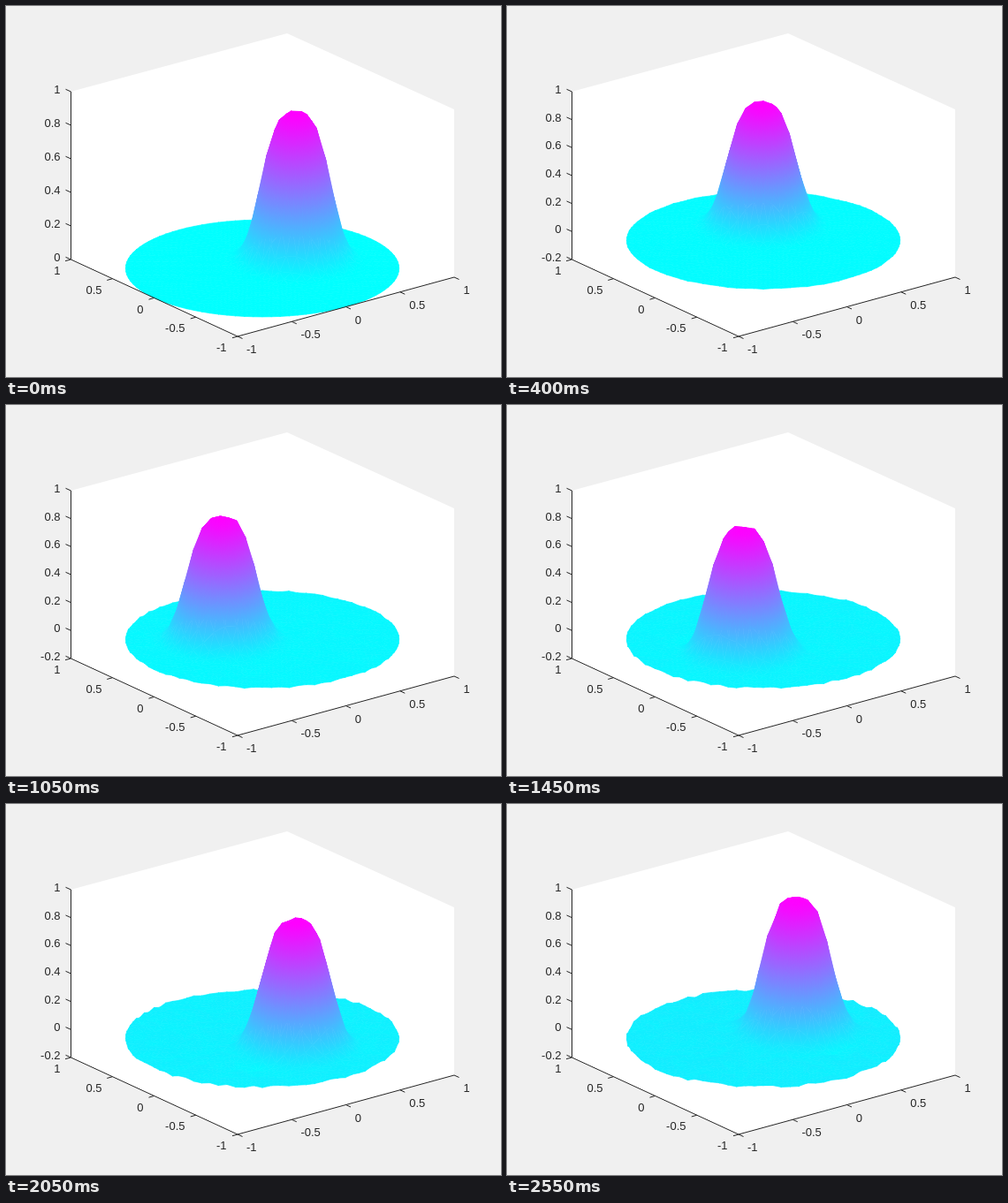
An HTML page with a canvas that plays this animation: 560x420 px, repeating every 2.6 s.

```html
<!DOCTYPE html>
<html lang="en">
<head>
<meta charset="utf-8">
<title>Rotating hump on a disk</title>
<style>
html, body { margin: 0; width: 100%; height: 100%; overflow: hidden; background: #f0f0f0; }
canvas, svg { position: absolute; left: 0; top: 0; width: 560px; height: 420px; }
text { font: 13px "Liberation Sans", Arial, sans-serif; fill: #262626; }
path { stroke: #262626; stroke-width: 1; fill: none; }
</style>
</head>
<body>
<canvas id="plot" width="560" height="420"></canvas>
<svg viewBox="0 0 560 420">
  <path id="lines"/>
  <g id="fixed"></g>
  <g id="heights"></g>
</svg>
<script>
const LOOP = 2600, STEP = 50, TURN = 2550;
const RINGS = 16, ORBIT = 0.3;
const ctx = document.getElementById('plot').getContext('2d');
const byId = id => document.getElementById(id);

// Disk mesh: ring i holds 6i nodes; u points right, d points away from the viewer.
const nodes = [{ u: 0, d: 0 }];
const tris = [];
const nodeAt = (ring, k) =>
  ring ? 1 + 3 * ring * (ring - 1) + (k % (6 * ring)) : 0;

function buildMesh() {
  for (let i = 1; i <= RINGS; i++) {
    for (let k = 0; k < 6 * i; k++) {
      const a = k / (6 * i) * 2 * Math.PI;
      nodes.push({ u: i / RINGS * Math.cos(a), d: i / RINGS * Math.sin(a) });
    }
    for (let s = 0; s < 6; s++) {
      for (let k = 0; k < i; k++) {
        const o = s * i + k, n = s * (i - 1) + k;
        tris.push([nodeAt(i, o), nodeAt(i, o + 1), nodeAt(i - 1, n)]);
        if (k < i - 1) {
          tris.push([nodeAt(i - 1, n), nodeAt(i, o + 1), nodeAt(i - 1, n + 1)]);
        }
      }
    }
  }
  let seed = 7;
  const random = () => (seed = seed * 16807 % 2147483647) / 2147483647;
  for (const n of nodes) {
    n.phase = random() * 6.283;
    n.rate = 0.15 + random() * 0.45;
  }
  const depth = t => t.reduce((sum, i) => sum + nodes[i].d, 0);
  tris.sort((a, b) => depth(b) - depth(a));
}

function cool(v) {
  const c = Math.max(0, Math.min(1, v));
  return `rgb(${Math.round(255 * c)},${Math.round(255 * (1 - c))},255)`;
}

// A linear gradient reproduces linear interpolation over the triangle.
function shade(a, b, c) {
  const x1 = b.x - a.x, y1 = b.y - a.y, x2 = c.x - a.x, y2 = c.y - a.y;
  const det = x1 * y2 - x2 * y1, v1 = b.v - a.v, v2 = c.v - a.v;
  const mean = (a.v + b.v + c.v) / 3;
  const lo = Math.min(a.v, b.v, c.v), hi = Math.max(a.v, b.v, c.v);
  if (Math.abs(det) < 0.5 || hi - lo < 0.008) return cool(mean);
  const gx = (v1 * y2 - v2 * y1) / det, gy = (x1 * v2 - x2 * v1) / det;
  const g2 = gx * gx + gy * gy;
  const at = v => [a.x + gx * (v - a.v) / g2, a.y + gy * (v - a.v) / g2];
  const grad = ctx.createLinearGradient(...at(lo), ...at(hi));
  grad.addColorStop(0, cool(lo));
  grad.addColorStop(1, cool(hi));
  return grad;
}

function polygon(points) {
  ctx.beginPath();
  points.forEach(([x, y]) => ctx.lineTo(x, y));
  ctx.closePath();
}

function drawSurface(step) {
  const s = step * STEP / TURN;
  const phi = 2 * Math.PI * s - 0.95;
  const sin = Math.sin(phi), cos = Math.cos(phi);
  const cu = -ORBIT * sin, cd = ORBIT * cos;
  const wakeU = cu + 0.4 * cos, wakeD = cd + 0.4 * sin;
  const peak = 0.876 + 0.055 * s ** 3, low = -0.066 * s;
  const zScale = step ? 190 / 1.2 : 190;
  const y0 = step ? 297 - 190 / 6 : 297;

  for (const n of nodes) {
    const r = Math.hypot(n.u - cu, n.d - cd);
    const bump = Math.exp(-((r / 0.292) ** 3.3));
    const wake = Math.hypot(n.u - wakeU, n.d - wakeD) / 0.16;
    const ripple = 0.01 * s ** 0.75 * Math.sin(n.phase + n.rate * step);
    const z = peak * bump + ripple * (1 + 0.6 * bump) - 0.045 * s * Math.exp(-wake * wake);
    n.x = 290 + 154.7 * n.u;
    n.y = y0 - 54.9 * n.d - zScale * z;
    n.v = (z - low) / (peak - low);
  }

  ctx.clearRect(0, 0, 560, 420);
  ctx.fillStyle = '#fff';
  polygon([[73, 97], [318, 31], [507, 117], [507, 307], [262, 374], [73, 287]]);
  ctx.fill();
  ctx.lineWidth = 0.7;
  ctx.lineJoin = 'round';
  for (const t of tris) {
    const [a, b, c] = t.map(i => nodes[i]);
    ctx.fillStyle = ctx.strokeStyle = shade(a, b, c);
    polygon([[a.x, a.y], [b.x, b.y], [c.x, c.y]]);
    ctx.fill();
    ctx.stroke();
  }
}

const label = (x, mid, value, anchor) =>
  `<text x="${x}" y="${Math.round(mid + 4.5)}" text-anchor="${anchor}">${value}</text>`;
const tick = (x, y, dx, dy) => `M${x} ${y}l${dx} ${dy}`;

function drawAxes(wide) {
  const base = wide ? -0.2 : 0, count = wide ? 6 : 5;
  let path = 'M73.5 97V287L262 374L507 307', texts = '', fixed = '';
  for (let i = 0; i <= count; i++) {
    const y = 287 - 190 * i / count;
    path += tick(73.5, y, -6, -2.7);
    texts += label(61.5, y - 2.4, +(base + 0.2 * i).toFixed(1), 'end');
  }
  for (let i = 0; i < 5; i++) {
    const value = i / 2 - 1;
    path += tick(262 + 61.25 * i, 374 - 16.75 * i, 5.5, 2.5);
    path += tick(262 - 47.25 * i, 374 - 21.75 * i, -6, 1.7);
    fixed += label(272 + 61.4 * i, 388.5 - 16.7 * i, value, 'start');
    fixed += label(249.5 - 47 * i, 386.5 - 21.7 * i, value, 'end');
  }
  byId('lines').setAttribute('d', path);
  byId('heights').innerHTML = texts;
  byId('fixed').innerHTML = fixed;
}

let shown = -1, wideShown = null;
function frame() {
  const step = Math.floor(performance.now() % LOOP / STEP);
  if (step !== shown) {
    shown = step;
    const wide = step > 0;
    if (wide !== wideShown) drawAxes(wideShown = wide);
    drawSurface(step);
  }
  requestAnimationFrame(frame);
}

buildMesh();
frame();
</script>
</body>
</html>
```
